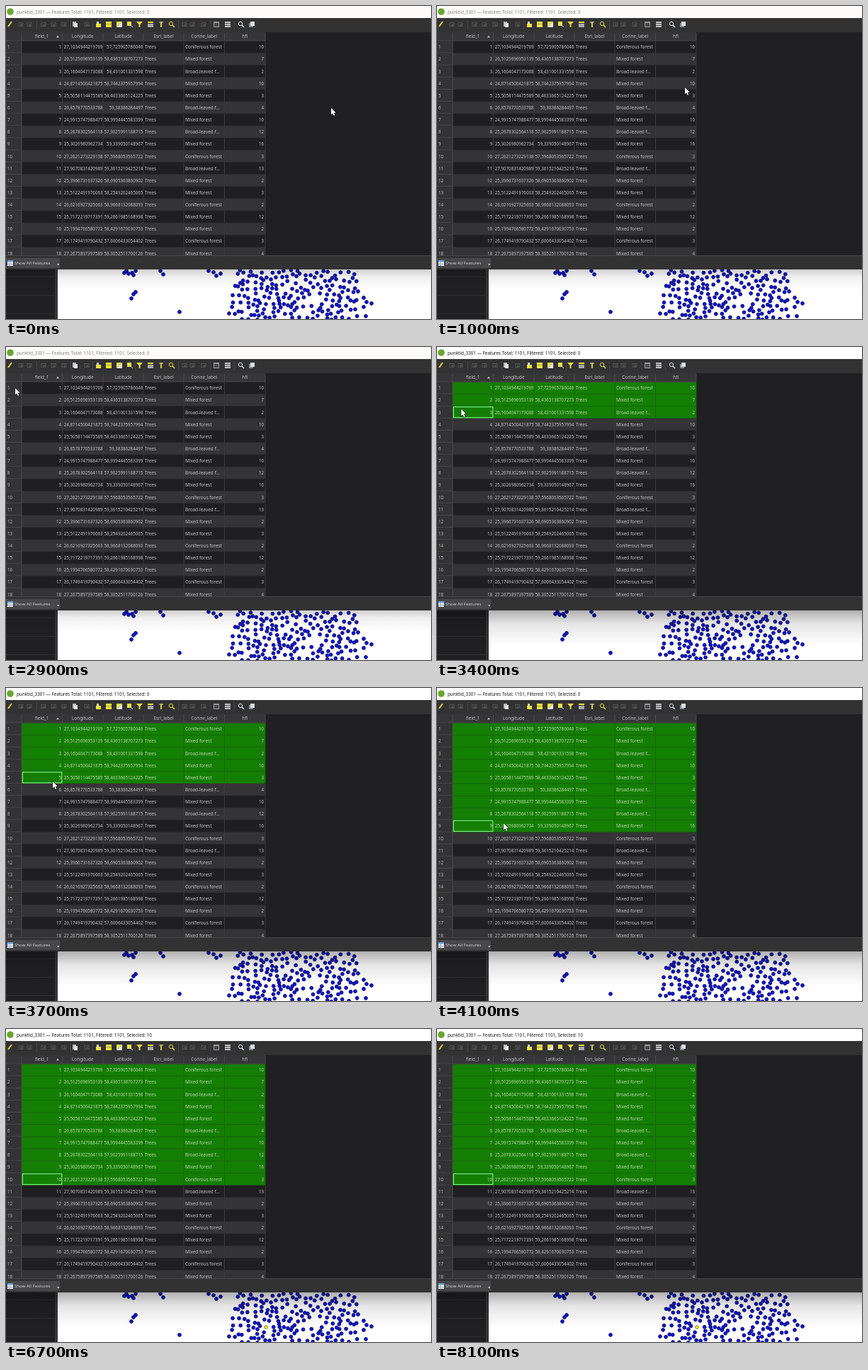
Write an HTML page with a canvas that moves like this. It is 600x442 px and loops after 8600 ms.

```html
<!DOCTYPE html>
<html lang="en">
<head>
<meta charset="utf-8">
<title>Attribute table</title>
<style>
  html, body { margin: 0; width: 100%; height: 100%; overflow: hidden; background: #fff; }
  canvas { display: block; }
</style>
</head>
<body>
<canvas id="stage" width="600" height="442"></canvas>
<script>
const ctx = document.getElementById('stage').getContext('2d');
const LOOP = 8600, STEP = 100;
const ROW_TOP = 49.5, ROW_H = 17.13, TABLE_BOTTOM = 352;
const PRESS = 3100, RELEASE = 5400, CURSOR_GONE = 6700;
const EDGES = [22, 79.5, 137, 194, 251, 308.5, 366];
const FOREST = { C: 'Coniferous forest', M: 'Mixed forest', B: 'Broad-leaved f...' };

// longitude, latitude, forest type, hfi
const ROWS = `27,1034944219769 57,725905786046 C 10
26,5125696953139 58,4365138707273 M 7
26,1604047173088 58,431001331598 B 2
24,8714500421875 58,7442375957994 M 10
25,5058114475589 58,4633665124225 M 3
26,8578770533788 59,38386284497 B 4
24,9915747988477 58,9994445583399 M 10
25,2678302564118 57,9025991188715 B 12
25,3026980962734 59,339050148967 M 16
27,2621273229138 57,5968053565722 C 3
27,9070831420989 59,3615210425214 B 13
25,3966731637326 58,6905363860902 M 2
25,5122491976063 58,2549202465065 M 3
26,6216927325663 58,9668132088093 C 2
25,7172219717391 59,2661985168998 M 12
25,1994766580772 58,4291670030753 M 2
26,1749419790432 57,6006433054402 C 3
27,2675897397589 58,3052511700126 M 4`.split('\n').map(line => line.split(' '));

// time, x, y of the pointer tip
const PATH = [
  [0, 459, 144], [1000, 350, 115], [2000, 110, 72], [2800, 13, 58], [3200, 13, 58],
  [3700, 66, 132], [4100, 94, 191], [4500, 100, 217], [5300, 100, 217],
  [5800, 219, 147], [6200, 240, 20], [LOOP, 240, 20]
];

function rect(x, y, w, h, color) {
  ctx.fillStyle = color;
  ctx.fillRect(x, y, w, h);
}

function line(color, width, ...points) {
  ctx.beginPath();
  for (let i = 0; i < points.length; i += 2) ctx.lineTo(points[i], points[i + 1]);
  ctx.strokeStyle = color;
  ctx.lineWidth = width;
  ctx.stroke();
}

function shape(color, ...points) {
  ctx.beginPath();
  for (let i = 0; i < points.length; i += 2) ctx.lineTo(points[i], points[i + 1]);
  ctx.closePath();
  ctx.fillStyle = color;
  ctx.fill();
}

function disc(x, y, r, fill, stroke) {
  ctx.beginPath();
  ctx.arc(x, y, r, 0, 7);
  if (fill) { ctx.fillStyle = fill; ctx.fill(); }
  if (stroke) { ctx.strokeStyle = stroke; ctx.lineWidth = 1; ctx.stroke(); }
}

function text(str, x, y, color, align = 'left', size = 6.4) {
  ctx.font = `${size}px "Noto Sans", "Open Sans", sans-serif`;
  ctx.textAlign = align;
  ctx.textBaseline = 'alphabetic';
  ctx.fillStyle = color;
  ctx.fillText(str, x, y + 2.3);
}

function makeDots() {
  const dots = [[167, 377], [170, 374], [173, 378], [178, 377], [183, 374], [180, 380],
    [218, 374], [222, 379], [183, 404], [180, 407], [177, 413], [245, 432], [286, 374],
    [293, 376], [297, 381], [303, 378], [516, 420], [509, 418], [505, 425], [505, 412],
    [497, 403], [508, 438]];
  let seed = 11;
  const random = () => (seed = seed * 16807 % 2147483647) / 2147483647;
  for (let tries = 0; tries < 1500 && dots.length < 205; tries++) {
    const y = 373 + random() * 70;
    const left = 327 - (y - 373) * 0.2;
    const x = left + random() * (496 - left);
    const spacing = random() < 0.3 ? 4 : 6;
    const free = dots.every(([a, b]) => Math.hypot(a - x, b - y) > spacing);
    if (free && Math.hypot(367 - x, 421 - y) > 5) dots.push([x, y]);
  }
  return dots;
}
const DOTS = makeDots();

function drawMap(active, released) {
  rect(0, 372, 600, 70, '#fff');
  for (const [x, y] of DOTS) disc(x, y, 2.4, '#1414d8', '#0b0b70');
  disc(367, 421, 2.3, released ? '#fff432' : '#1414d8', released ? '#77731c' : '#0b0b70');
  rect(0, 372, 69, 70, '#202022');
  rect(69, 372, 4, 70, '#343435');
  for (const y of [382, 408, 434]) rect(0, y, 69, 1, '#303032');

  const depth = active ? 50 : 30;
  const shadow = ctx.createLinearGradient(0, 371, 0, 371 + depth);
  shadow.addColorStop(0, `rgba(0,0,0,${active ? 0.32 : 0.2})`);
  shadow.addColorStop(0.4, `rgba(0,0,0,${active ? 0.1 : 0.06})`);
  shadow.addColorStop(1, 'rgba(0,0,0,0)');
  rect(0, 371, 600, depth, shadow);
}

function magnifier(x, color) {
  disc(x - 1, 25, 2.7, null, color);
  line(color, 1.5, x + 1, 27, x + 4, 30);
}

function drawToolbar() {
  rect(0, 17, 600, 20, '#323233');
  line('#e0d84a', 2, 3, 29, 8, 22);
  for (const x of [21, 33, 53, 67, 82, 114, 252, 263, 279]) {
    ctx.strokeStyle = '#555557';
    ctx.lineWidth = 1;
    ctx.strokeRect(x - 3, 23.5, 6, 5);
    rect(x - 1, 25, 3, 3, '#4b4b4d');
  }
  for (const x of [43, 91, 122, 182, 243, 288, 322]) rect(x, 20, 1, 13, '#444446');

  rect(94, 22, 5, 7, '#b8b8b8');
  rect(96, 24, 5, 6, '#e4e4e4');
  rect(127, 25, 7, 5, '#f2e53d');
  rect(128, 22, 3, 3, '#d8d8d8');
  rect(141, 22, 8, 8, '#f2e53d');
  rect(141, 25, 8, 1, '#a99e2a');
  shape('#f2e53d', 156, 22, 164, 22, 156, 30);
  shape('#e8e8e8', 164, 22, 164, 30, 156, 30);
  rect(171, 22, 6, 6, '#f2e53d');
  line('#d6d6d6', 1, 174, 25, 179, 30);
  shape('#e9dc3d', 184, 22, 193, 22, 189.5, 26, 189.5, 30, 187.5, 30, 187.5, 26);
  rect(200, 22, 8, 2, '#f2e53d');
  rect(200, 25, 8, 5, '#aaaaac');
  line('#e4e4e4', 1, 216, 23, 222, 23);
  line('#d8cb38', 2, 219, 22, 219, 30);
  magnifier(234, '#e6da3d');
  rect(293, 22, 8, 8, '#9b9b9d');
  rect(294, 24, 6, 5, '#4a4a4c');
  rect(309, 22, 8, 8, '#c3c3c5');
  for (const y of [24, 27]) rect(309, y, 8, 1, '#555');
  magnifier(332, '#d9e3ea');
  rect(343, 24, 6, 6, '#7f8d98');
  rect(345, 22, 6, 6, '#dedede');
}

function drawTable(selected) {
  rect(0, 37, 600, 315, '#201f21');
  ctx.save();
  ctx.beginPath();
  ctx.rect(0, 37, 600, TABLE_BOTTOM - 37);
  ctx.clip();

  ROWS.forEach(([lon, lat, type, hfi], i) => {
    const top = ROW_TOP + i * ROW_H, mid = top + ROW_H / 2;
    const chosen = i < selected;
    const ink = chosen ? '#b4d8ac' : '#c2c2c2';
    rect(22, top, 344, ROW_H, chosen ? '#157e05' : i % 2 ? '#343335' : '#1f1e20');
    rect(22, top + ROW_H - 0.7, 344, 0.7, chosen ? '#0e6403' : '#2c2b2d');
    for (const x of EDGES.slice(1)) rect(x - 0.5, top, 1, ROW_H, chosen ? '#126b06' : '#3b3a3c');

    rect(0, top, 22, ROW_H, '#333234');
    rect(0, top + ROW_H - 1, 22, 1, '#4c4b4d');
    rect(21.5, top, 1, ROW_H, '#4c4b4d');
    text(i + 1, 2, mid, '#bcbcbc', 'left', 6.2);

    text(i + 1, 78, mid, ink, 'right', 6.2);
    text(lon, 136.5, mid, ink, 'right', 6.2);
    text(lat, 193.3, mid, ink, 'right', 6.2);
    text('Trees', 196, mid, ink);
    text(FOREST[type], 253, mid, ink);
    text(hfi, 364, mid, ink, 'right', 6.2);
  });

  if (selected) {
    ctx.strokeStyle = '#7df084';
    ctx.lineWidth = 1.2;
    ctx.strokeRect(23.4, ROW_TOP + (selected - 1) * ROW_H + 0.8, 55.4, ROW_H - 2);
  }
  ctx.restore();

  rect(0, 37, 366, 12, '#363537');
  rect(0, 48.5, 366, 1, '#4a494b');
  for (const x of EDGES) rect(x - 0.5, 38, 1, 11, '#4c4b4d');
  const heads = ['field_1', 'Longitude', 'Latitude', 'Esri_label', 'Corine_label', 'hfi'];
  heads.forEach((head, i) => text(head, (EDGES[i] + EDGES[i + 1]) / 2, 43, '#c0c0c0', 'center'));
  shape('#c0c0c0', 71, 44.5, 75, 44.5, 73, 41.5);
}

function drawStatus() {
  rect(0, TABLE_BOTTOM, 600, 20, '#323233');
  rect(0, TABLE_BOTTOM, 600, 1, '#454547');
  rect(0, 356, 76, 14, '#48474a');
  rect(2, 359, 8, 8, '#e8edf2');
  rect(2, 359, 8, 2.5, '#6f9fd8');
  rect(4.5, 361, 1, 6, '#93a7bd');
  rect(2, 364, 8, 1, '#93a7bd');
  text('Show All Features', 12, 363, '#d0d0d0', 'left', 6.1);
  shape('#d0d0d0', 72, 364, 75.5, 364, 73.7, 366.5);
}

function drawTitle(active, count) {
  rect(0, 0, 600, 17, active ? '#fff' : '#fdfcfa');
  disc(6, 8, 4.8, '#6aa62f');
  text(`punktid_3301 — Features Total: 1101, Filtered: 1101, Selected: ${count}`,
    15, 8.5, active ? '#161616' : '#858585', 'left', 6.3);
}

function pointerAt(time) {
  const i = PATH.findIndex(([start], n) => n && time <= start);
  const [t0, x0, y0] = PATH[i - 1], [t1, x1, y1] = PATH[i];
  const k = (time - t0) / (t1 - t0);
  return [x0 + (x1 - x0) * k, y0 + (y1 - y0) * k];
}

function drawPointer(x, y) {
  ctx.save();
  ctx.translate(x, y);
  const arrow = [0, 0, 0, 9.6, 2.2, 7.6, 3.8, 11, 5.3, 10.3, 3.8, 7, 6.7, 6.8];
  line('#111', 1.2, ...arrow, 0, 0);
  shape('#fff', ...arrow);
  ctx.restore();
}

function rowsSelected(time) {
  if (time < PRESS) return 0;
  const y = pointerAt(Math.min(time, 4500))[1];
  return Math.min(10, Math.floor((y - ROW_TOP) / ROW_H) + 1);
}

function draw() {
  const time = Math.floor(performance.now() % LOOP / STEP) * STEP;
  const active = time >= PRESS, released = time >= RELEASE;
  drawMap(active, released);
  drawTitle(active, released ? 10 : 0);
  drawToolbar();
  drawTable(rowsSelected(time));
  drawStatus();
  if (time < CURSOR_GONE) drawPointer(...pointerAt(time));
  requestAnimationFrame(draw);
}
draw();
</script>
</body>
</html>
```
